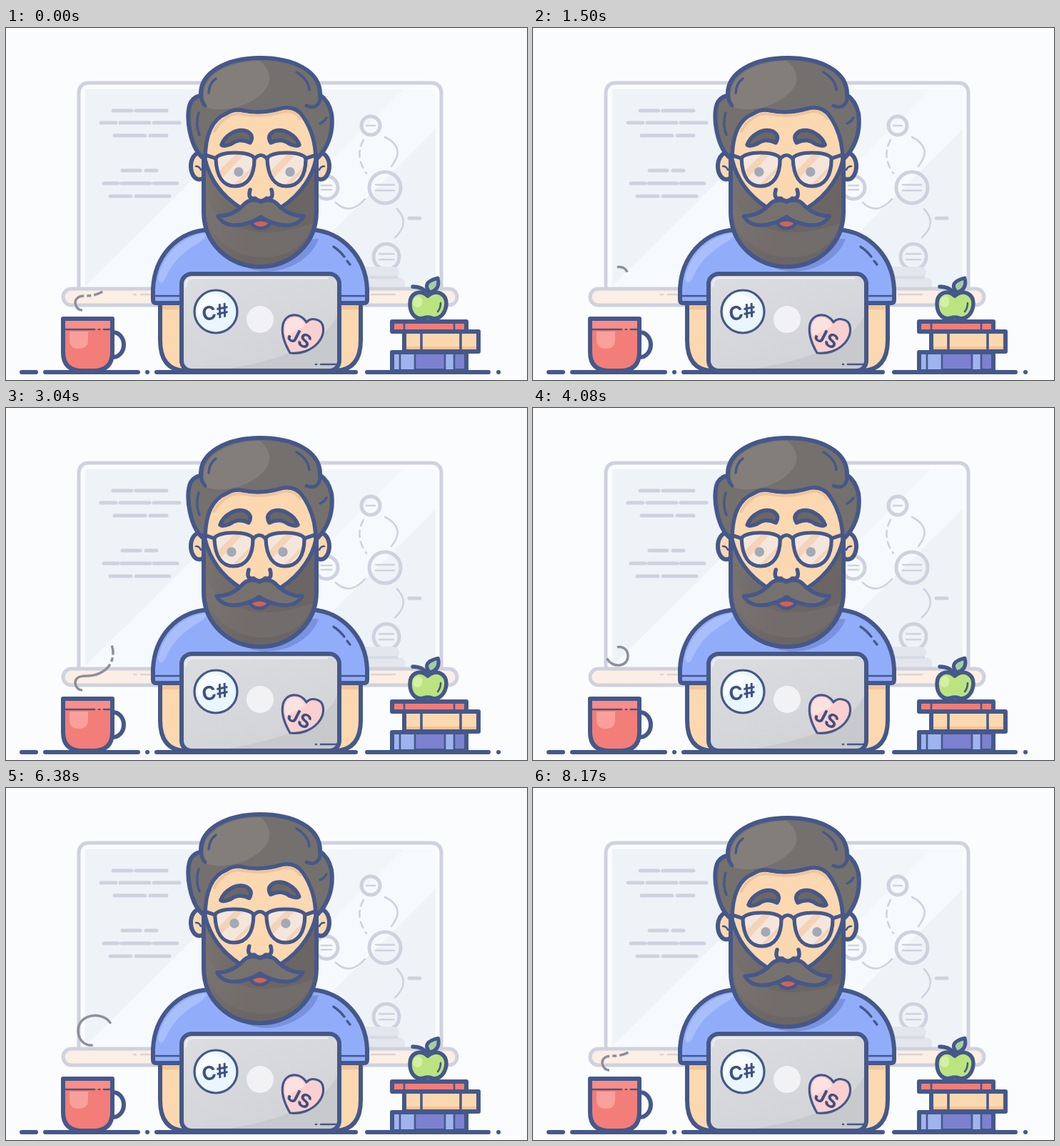
Animation, 730 px wide and 494 px high, one loop 8.21 s. Source, as an HTML page:

```html
<!DOCTYPE html>
<html lang="en">
<head>
<meta charset="utf-8">
<title>Developer at the desk</title>
<style>
html, body { margin: 0; width: 100%; height: 100%; overflow: hidden; background: #fbfcfe; }
svg { display: block; width: 730px; height: 494px; }
path, line, circle, rect { stroke-linecap: round; stroke-linejoin: round; }
.pale { stroke: #cfd2de; stroke-width: 5; fill: none; }
.thin { stroke-width: 2.6; }
.ink { stroke: #45588a; stroke-width: 6; fill: none; }
.fine { stroke-width: 2.6; }
.plain { stroke: none; }
text { font: bold 27px Inter, "Liberation Sans", sans-serif; fill: #3f5080; text-anchor: middle; stroke: none; }
</style>
</head>
<body>
<svg viewBox="0 0 730 494">
  <defs>
    <linearGradient id="metal" x2="0.6" y2="1">
      <stop offset="0" stop-color="#dcdde0"/><stop offset="1" stop-color="#d2d3d6"/>
    </linearGradient>
    <linearGradient id="beard" x2="1" y2="0.3">
      <stop offset="0" stop-color="#7a7471"/><stop offset="0.6" stop-color="#6b6563"/>
    </linearGradient>
    <clipPath id="lid"><rect x="246" y="345" width="221" height="136" rx="14"/></clipPath>
    <path id="lens" d="M294 184C295 172 347 172 348 184C348 208 338 222 321 222S295 208 294 184Z"/>
    <clipPath id="lenses"><use href="#lens"/><use href="#lens" x="72"/></clipPath>
  </defs>

  <!-- board -->
  <path class="pale" style="fill:#fafcfd" d="M102 366V92Q102 77 117 77H595Q610 77 610 92V366"/>
  <path fill="#f7fafc" d="M111 86H602V364H111Z"/>
  <path fill="#eef3f7" d="M111 86H390L111 362ZM602 142V364H379Z"/>
  <path fill="#f2f6f9" d="M415 86H557L330 312V170Z"/>
  <g class="pale" id="notes"></g>
  <g class="pale">
    <circle cx="511" cy="137" r="13"/><circle cx="449" cy="224" r="16"/>
    <circle cx="531" cy="224" r="22"/><circle cx="533" cy="321" r="18"/>
    <path d="M565 267H580"/>
    <g class="thin">
      <path d="M505 137H517M442 221H456M442 227H456M518 220H544M518 228H544M523 317H543M523 325H543"/>
      <path d="M531 153Q561 168 540 194M462 245Q482 264 503 240M548 254Q567 274 545 294"/>
      <path stroke-dasharray="9 7" d="M501 157Q488 180 505 204"/>
    </g>
  </g>
  <path fill="#e3e6ed" d="M490 335H541Q551 335 551 343T541 350H549Q559 350 559 358V366H490Z"/>
  <path fill="#d7dbe5" d="M490 348H549V352H490Z"/>
  <rect class="pale" style="fill:#fbeee4" x="80" y="366" width="552" height="23" rx="11.5"/>
  <path class="thin" stroke="#ddd3d2" fill="none" d="M179 374H182M189 374H207M512 374H545M602 374H606"/>

  <path id="steam" fill="none" stroke="#8e8f9c" stroke-width="3.5" style="stroke-linecap:butt"
    d="M107 396C98 396 94 384 100 379C103 376 108 376 113 376C128 376 150 368 150 343C150 312 102 312 101 340C101 366 133 367 133 348C133 336 122 334 118 336"/>

  <!-- mug -->
  <g class="ink">
    <path d="M150 427a15 17.5 0 0 1 0 35"/>
    <path fill="#f37d78" d="M80 408H149V455Q149 481 122 481H107Q80 481 80 455Z"/>
    <path class="plain" fill="#f98d87" d="M83 411H146V422H83Z"/>
    <path class="plain" fill="#f9a09a" d="M89 426H115V438Q115 450 102 450T89 438Z"/>
    <path class="fine" d="M83 423H124M130 423H131M137 423H146"/>
  </g>

  <!-- body -->
  <g class="ink">
    <path fill="#fbd8b0" d="M216 382V438C216 464 226 480 250 481H462C487 480 497 464 497 438V382Z"/>
    <path class="plain" fill="#f1c49a" d="M219 388H245V395H219ZM468 388H494V395H468Z"/>
    <path fill="#91adfa" d="M210 386Q206 386 206 381V366C208 322 238 285 285 283H428C472 286 504 322 506 366V381Q506 386 502 386Z"/>
    <path class="plain" fill="#a8bffb" d="M213 352C219 320 245 292 280 288C286 300 242 306 224 350Q217 364 213 352Z"/>
    <path class="fine" d="M209 376H245M468 376H503"/>
    <path stroke-width="3.4" d="M459 307Q467 312 474 321M478 327L482 332"/>
  </g>

  <g id="head" class="ink">
    <path class="plain" fill="#7892df" d="M300 296H438C428 324 396 342 362 342C334 340 312 324 300 296Z"/>
    <ellipse fill="#fbd8b0" cx="271" cy="194" rx="12" ry="18.5"/>
    <ellipse fill="#fbd8b0" cx="441" cy="194" rx="12" ry="18.5"/>
    <path class="fine" d="M266 194Q271 194 273 199M446 194Q441 194 439 199"/>
    <path fill="#74706d" d="M278 184C258 170 250 122 259 104Q264 96 273 95C271 62 310 42 356 42C402 42 441 60 440 94Q452 102 456 120C460 150 448 172 435 184Z"/>
    <path class="plain" fill="#837e7a" d="M277 96C276 64 315 46 356 46C372 60 376 78 355 95C335 112 300 119 281 111Z"/>
    <path fill="url(#beard)" d="M277 180V258C277 304 314 335 356 335S435 304 435 258V180Z"/>
    <path class="plain" fill="#7d7774" d="M281 240C306 285 355 300 430 274C420 310 388 323 356 322C314 320 281 290 281 260Z" opacity=".4"/>
    <path stroke-width="5.5" fill="#fbd8b0" d="M279 185C279 150 288 128 309 120Q320 113 333 116Q358 121 385 113Q405 108 416 124Q434 150 434 185C430 205 416 232 385 252H328C297 232 284 205 279 185Z"/>
    <path stroke="#eec59e" stroke-width="4" d="M292 145Q298 132 312 124Q321 119 333 121Q358 126 386 118Q403 114 412 127"/>
    <path stroke-width="5" d="M273 95Q274 104 279 109M440 94Q441 106 433 110Q427 112 421 109"/>
    <path stroke-width="3.5" d="M284 91Q285 77 294 71M407 62Q424 72 425 87M270 119Q265 135 271 150M449 126Q445 132 440 134"/>

    <g id="face">
      <path id="browL" class="brow" fill="#6c6664" stroke-width="5.5" d="M302 164C307 150 324 140 338 145Q348 151 342 161C330 155 322 158 315 163Q305 167 302 164Z"/>
      <path id="browR" class="brow" fill="#6c6664" stroke-width="5.5" d="M411 164C406 150 389 140 375 145Q365 151 371 161C383 155 391 158 398 163Q408 167 411 164Z"/>
      <path stroke-width="5.5" fill="#fbd8b0" d="M342 227Q338 241 349 239Q357 247 365 239Q376 241 372 227"/>
      <g clip-path="url(#lenses)" stroke="none">
        <path fill="#f5e6dc" d="M290 172H425V225H290Z"/>
        <path fill="#f5d3b7" d="M291 208L325 174H337L297 217ZM363 208L397 174H409L369 217ZM317 222L349 190V196L324 222ZM389 222L421 190V196L396 222Z"/>
      </g>
      <g id="eyes" fill="#a2a9b8" stroke="none">
        <circle cx="326" cy="202" r="6.7"/><circle cx="398" cy="202" r="6.7"/>
      </g>
      <g stroke-width="5.2">
        <use href="#lens"/><use href="#lens" x="72"/>
        <path d="M348 184Q357 173 366 184M294 183L279 178M420 183L435 178"/>
      </g>
      <path fill="#cf6358" stroke-width="4.5" d="M343 273Q357 265 371 273Q366 281 357 281T343 273Z"/>
      <path fill="#77716e" stroke-width="5.5" d="M357 244Q342 237 331 250Q317 264 297 264Q306 280 330 276Q348 272 357 265Q366 272 384 276Q408 280 417 264Q397 264 383 250Q372 237 357 244Z"/>
    </g>
  </g>

  <!-- laptop -->
  <g class="ink">
    <g clip-path="url(#lid)" stroke="none">
      <path fill="url(#metal)" d="M246 345H467V481H246Z"/>
      <path fill="#c8c9cc" d="M467 395C455 440 390 468 290 481H467Z"/>
    </g>
    <path stroke="#ecedf0" stroke-width="2.5" d="M252 362Q252 351 262 351H450"/>
    <rect x="246" y="345" width="221" height="136" rx="14"/>
    <circle class="plain" fill="#f2f2f4" cx="356" cy="409" r="19"/>
    <circle fill="#e9f6fc" stroke-width="3.2" cx="294" cy="398" r="30"/>
    <path class="plain" fill="#f7fcff" d="M268 404Q266 379 287 372Q306 375 312 388Z"/>
    <text transform="translate(295 408) rotate(-11)">C#</text>
    <path fill="#f9cfcf" stroke-width="3.2" d="M421 413C412 398 392 400 388 416C385 430 391 444 398 456C412 458 427 453 437 442C449 428 446 411 434 409Q426 407 421 413Z"/>
    <path class="plain" fill="#fce1e1" d="M392 432Q387 408 404 406Q414 406 419 418Q408 425 392 432Z"/>
    <text transform="translate(407 444) rotate(27)">JS</text>
    <path class="fine" d="M434 472H435M441 472H464"/>
  </g>

  <!-- books and fruit -->
  <g class="ink">
    <path fill="#7c82cf" d="M541 455H645V481H541Z"/>
    <path class="plain" fill="#9fb4ee" d="M544 458H573V479H544ZM616 458H627V479H616Z"/>
    <path class="fine" d="M552 458V479M573 458V479M615 458V479M628 458V479"/>
    <path fill="#fbd8b0" d="M558 426H662V454H558Z"/>
    <path class="plain" fill="#f5c398" d="M561 447H659V451H561Z"/>
    <path stroke-width="3.5" d="M582 428V452M637 428V452"/>
    <path fill="#f37d78" d="M541 412H645V426H541Z"/>
    <path class="fine" d="M558 414V424M628 414V424"/>
    <path stroke-width="5.5" fill="#bbe480" d="M591 376C604 365 617 374 617 387C616 402 606 410 597 407Q591 405 585 407C575 410 566 402 566 387C566 374 578 365 591 376Z"/>
    <path class="plain" fill="#d3f0a3" d="M570 388Q570 377 579 376Q585 379 583 388Q577 396 570 388Z"/>
    <path class="fine" d="M609 386Q609 393 605 398"/>
    <path stroke-width="5.5" d="M591 376Q586 363 570 363"/>
    <path id="leaf" fill="#a3cda0" stroke-width="5" d="M594 371Q581 357 605 351Q609 367 594 371Z"/>
  </g>

  <path class="ink" d="M22 483H42M55 483H185M198 483H198.1M211 483H490M506 483H676M690 483H690.1"/>
</svg>
<script>
const $ = id => document.getElementById(id);
const LOOP = 8210, PUFF = LOOP / 3;

// Written lines on the board: y, then start and end pairs
const rows = [
  [116, 150, 176, 182, 225], [133, 133, 154, 160, 201, 207, 243], [151, 152, 195, 202, 225],
  [200, 163, 188, 196, 211], [218, 137, 157, 162, 202, 207, 240], [236, 146, 175, 182, 229]
];
let strokes = '';
for (const [y, ...xs] of rows)
  for (let i = 0; i < xs.length; i += 2) strokes += `M${xs[i]} ${y}H${xs[i + 1]}`;
$('notes').innerHTML = `<path d="${strokes}"/>`;

const clamp = v => Math.max(0, Math.min(1, v));
const ease = (t, a, b) => { const u = clamp((t - a) / (b - a)); return u * u * (3 - 2 * u); };
const move = (id, x, y) => $(id).setAttribute('transform', `translate(${x} ${y})`);

// Linear interpolation through [time, value] points
function track(points, t) {
  let [a, v] = points[0];
  for (const [b, w] of points) {
    if (t < b) return v + (w - v) * clamp((t - a) / (b - a));
    [a, v] = [b, w];
  }
  return v;
}

const length = $('steam').getTotalLength();
const front = [[0, 0], [60, 14], [113, 21], [546, 58], [587, 60], [1467, 182], [1493, 199], [1850, length]];
const back = [[980, 0], [1230, 42], [1467, 91], [1493, 105], [1930, 177], [2150, length]];

function drawSteam(t) {
  const head = track(front, t), tail = track(back, t);
  const gap = 4 * clamp((t - 200) / 300) * clamp((1300 - t) / 300);
  const cuts = [tail, head - 19 - 2 * gap, head - 19 - gap, head - 13 - gap, head - 13, head];
  const dashes = [0];
  let last = 0;
  for (const c of cuts) {
    const at = Math.max(last, tail, c);
    dashes.push(at - last);
    last = at;
  }
  dashes.push(999);
  $('steam').style.strokeDasharray = dashes.join(' ');
  $('steam').style.visibility = head - tail > 0.5 ? 'visible' : 'hidden';
}

function draw(now) {
  const t = now % LOOP;
  const settle = ease(t, 6700, 8000);
  const look = -10 * ease(t, 400, 1730) + 4 * ease(t, 3700, 4700) + 6 * settle;
  const up = ease(t, 4200, 5800) - settle;
  const shift = look * 0.2;
  move('head', 0, -5 * up);
  move('face', shift, 0);
  move('eyes', look - shift, -7 * up);
  move('browL', 0, -1.5 * up);
  move('browR', up, -6.5 * up);
  $('leaf').setAttribute('transform', `rotate(${1.5 * Math.sin(2 * Math.PI * t / PUFF)} 592 371)`);
  drawSteam((t + 587) % PUFF);
}

const start = performance.now();
function tick() {
  draw(performance.now() - start);
  requestAnimationFrame(tick);
}
tick();
</script>
</body>
</html>
```
